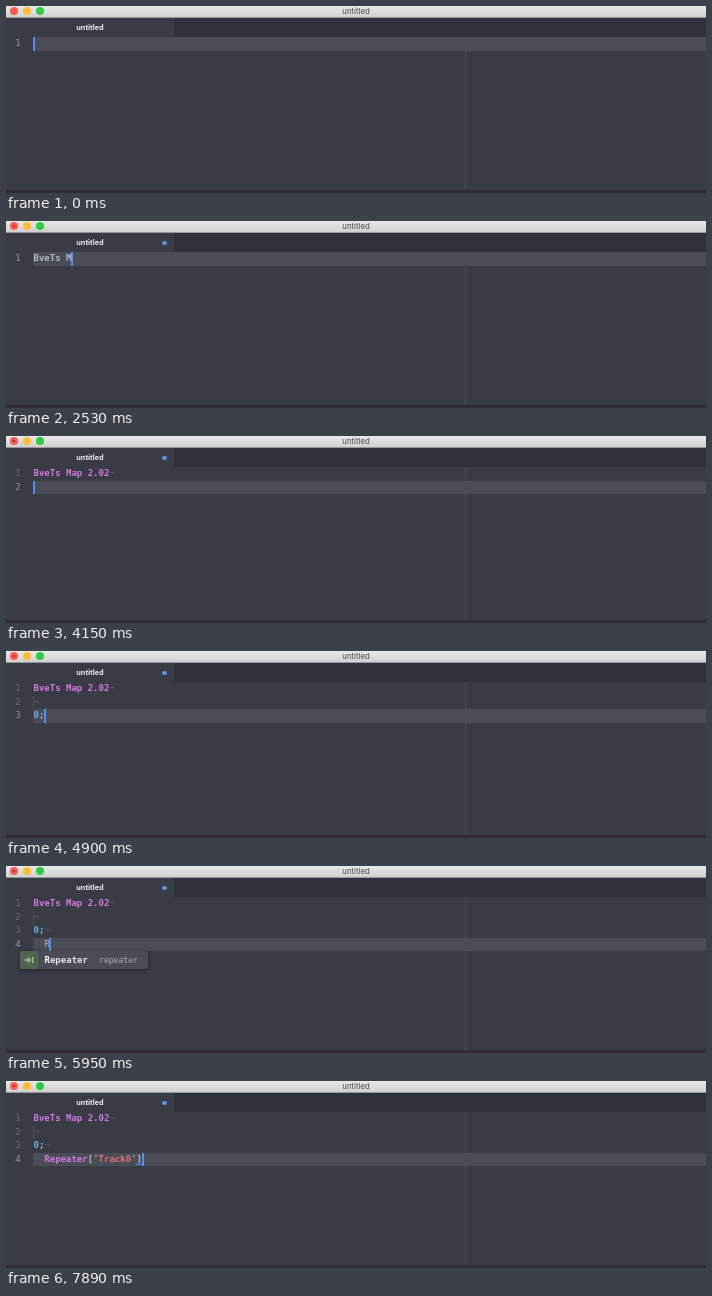
These frames come from a looping animation (700 px wide and 187 px high, 8000 ms). An HTML page:

```html
<!DOCTYPE html>
<html lang="en">
<head>
<meta charset="utf-8">
<title>Editor typing</title>
<style>
html, body { margin: 0; width: 100%; height: 100%; overflow: hidden; background: #393c45; }
#stage { position: relative; width: 700px; height: 187px; overflow: hidden; background: #393c45;
  font: 9px/13.5px "DejaVu Sans Mono", monospace; color: #abb2bf; }
#stage div, #stage i { position: absolute; }
.bar { left: 0; top: 0; width: 700px; height: 12px; background: linear-gradient(#e9e8e9, #d2d1d2 11px, #98989b 11px);
  font: 7.8px/11px Inter, sans-serif; color: #4b4b4b; text-align: center; }
.light { top: 1px; width: 8px; height: 8px; border-radius: 50%; }
.light.edited::after { content: ""; position: absolute; left: 2.6px; top: 2.6px; width: 2.8px; height: 2.8px;
  border-radius: 50%; background: #8c1f17; }
.tabs { left: 0; top: 12px; width: 700px; height: 19px; background: #2f323a; }
.tab { left: 0; top: 0; width: 168px; height: 19px; background: #393c45;
  font: 700 7.3px/20px Inter, sans-serif; color: #eceef2; text-align: center; }
#dot { left: 156.3px; top: 7.6px; width: 4.6px; height: 4.6px; border-radius: 50%; background: #5b94e3; }
#active { left: 27px; width: 673px; height: 13.6px; background: #4a4d56; }
.guide { left: 459px; top: 31px; width: 1px; height: 153px; background: #4b4e57; }
.base { left: 0; top: 184px; width: 700px; height: 3px; background: #302c36; }
#text { left: 0; top: 0; }
.line { left: 27.5px; white-space: pre; }
.num { left: 9.3px; color: #676c77; }
.num.on { color: #9398a3; }
.key, .str, .lit, .end, .raw { font-weight: bold; }
.key { color: #d578e4; }
.str { color: #e2707a; }
.lit { color: #66b4f0; }
.end { color: #93b2cb; }
.raw { color: #b4b9c4; }
.dim { color: #575b66; }
.pair { border-bottom: 1px solid #528bff; }
.indent { left: 27px; width: 1px; height: 13.5px; background: #4d515b; }
#caret { width: 2px; height: 13.6px; background: #568df5; }
#popup { border-radius: 2px; overflow: hidden; background: #2f3138; box-shadow: 0 1px 4px rgba(0,0,0,.45); }
.item { left: 0; width: 100%; height: 17.9px; line-height: 19px; color: #b3b8c3; font-weight: bold; }
.item.on { background: #4a4d57; color: #e2e5ea; }
.item svg { position: absolute; left: 0; top: 0; width: 18px; height: 18px; background: #47574c; }
.item.on svg { background: #526354; }
.word { left: 24.5px; }
.word::first-letter { color: #fff; }
.hint { font-size: 8.08px; font-weight: normal; color: #9499a4; -webkit-text-stroke: .2px #9499a4; }
</style>
</head>
<body>
<div id="stage">
  <div class="bar">untitled
    <i class="light" id="close" style="left:4px;background:#fc5b54"></i>
    <i class="light" style="left:17px;background:#fdbc36"></i>
    <i class="light" style="left:30px;background:#2fc944"></i>
  </div>
  <div class="tabs"><div class="tab">untitled</div><div id="dot"></div></div>
  <div id="active"></div>
  <div class="guide"></div>
  <div id="text"></div>
  <div id="caret"></div>
  <div id="popup"></div>
  <div class="base"></div>
</div>
<script>
const LOOP = 8000, LEFT = 27.5, TOP = 31.2, CHAR = 5.418, ROW = 13.5, ITEM = 17.9;
const $ = id => document.getElementById(id);

const menus = {
  dot: { col: 11, width: 202, hint: 120, items: [
    ['.Begin', 'repeater.begin'], ['.Begin0', 'repeater.begin0'], ['.Load', 'load'],
    ['.Position', 'position'], ['.BeginTransition', 'beginTransition']] },
  rep: { col: 2, width: 128, hint: 79, items: [['Repeater', 'repeater']] },
  track: { col: 12, width: 128, hint: 78.5, items: [['Track', 'track']] }
};

const head = 'BveTs Map 2.02', body = head + '\n\n0;\n', call = body + '  Repeater';

// [time, text, characters after the caret, menu, caret hidden]
const steps = [
  [0, ''], [150, '', 0, '', true], [600, ''], [1050, '', 0, '', true],
  [1200, 'B'], [1350, 'Bv'], [1650, 'Bve'], [1800, 'BveT'], [2080, 'BveTs'], [2230, 'BveTs '],
  [2530, 'BveTs M'], [2810, 'BveTs Ma'], [2960, 'BveTs Map'], [3260, 'BveTs Map 2'],
  [3400, 'BveTs Map 2.', 0, 'dot'], [3700, 'BveTs Map 2.0', 0, 'dot'], [3850, head],
  [4150, head + '\n'], [4300, head + '\n\n'], [4600, head + '\n\n0'], [4900, head + '\n\n0;'],
  [5200, body], [5350, body + ' '], [5650, body + '  '], [5950, body + '  R', 0, 'rep'],
  [6100, call], [6240, call + '[]', 1], [6540, call + "['']", 2],
  [6840, call + "['T']", 2, 'track'], [7140, call + "['Track']", 2],
  [7440, call + "['Track0']", 2], [7740, call + "['Track0']", 1], [7890, call + "['Track0']"]
];

const span = (cls, s) => `<span class="${cls}">${s}</span>`;

function paint(line, row, back) {
  if (row === 0) {
    if (line === head) return span('key', line);
    return line.length < 8 ? span('raw', line) : line;
  }
  if (row === 2) return line.replace(/^0/, span('lit', '0')).replace(/;$/, span('end', ';'));
  return line.replace(/^ +|Repeater|\w+(?=')|[[\]']/g, s => {
    if (s[0] === ' ') return span('dim', '·'.repeat(s.length));
    if (s === 'Repeater') return span('key', s);
    if (s === ']' && !back) return span('raw pair', s);
    return span(/\w/.test(s) ? 'str' : 'raw', s);
  });
}

function menuHtml(menu) {
  return menu.items.map(([word, hint], i) =>
    `<div class="item${i ? '' : ' on'}" style="top:${i * ITEM}px">` +
    '<svg viewBox="0 0 18 18"><path d="M4.2 9H9.5M7.5 6.4L10.2 9L7.5 11.6M12.6 6V12" fill="none" stroke="#9ac578" stroke-width="1.4"/></svg>' +
    `<div class="word">${word}</div><div class="hint" style="left:${menu.hint}px">${hint}</div></div>`
  ).join('');
}

function show([, text, back = 0, menuName, hidden]) {
  const lines = text.split('\n'), last = lines.length - 1, y = TOP + last * ROW;
  $('text').innerHTML = lines.map((line, i) => {
    const top = `style="top:${TOP + i * ROW}px"`;
    return (i === 1 && last > 1 ? `<div class="indent" ${top}></div>` : '') +
      `<div class="num${i === last ? ' on' : ''}" ${top}>${i + 1}</div>` +
      `<div class="line" ${top}>${paint(line, i, back)}${i < last ? span('dim', '¬') : ''}</div>`;
  }).join('');
  $('active').style.top = y + 'px';

  const caret = $('caret').style;
  caret.left = Math.round(LEFT - .3 + (lines[last].length - back) * CHAR) + 'px';
  caret.top = y + 'px';
  caret.visibility = hidden ? 'hidden' : 'visible';

  $('dot').style.visibility = text ? 'visible' : 'hidden';
  $('close').classList.toggle('edited', !!text);

  const popup = $('popup').style, menu = menus[menuName];
  popup.display = menu ? 'block' : 'none';
  if (menu) {
    popup.left = LEFT + menu.col * CHAR - 24.3 + 'px';
    popup.top = y + ROW + .2 + 'px';
    popup.width = menu.width + 'px';
    popup.height = menu.items.length * ITEM + 'px';
    $('popup').innerHTML = menuHtml(menu);
  }
}

let current;
function frame() {
  const t = performance.now() % LOOP;
  const step = steps.findLast(s => s[0] <= t);
  if (step !== current) show(current = step);
  requestAnimationFrame(frame);
}
frame();
</script>
</body>
</html>
```
